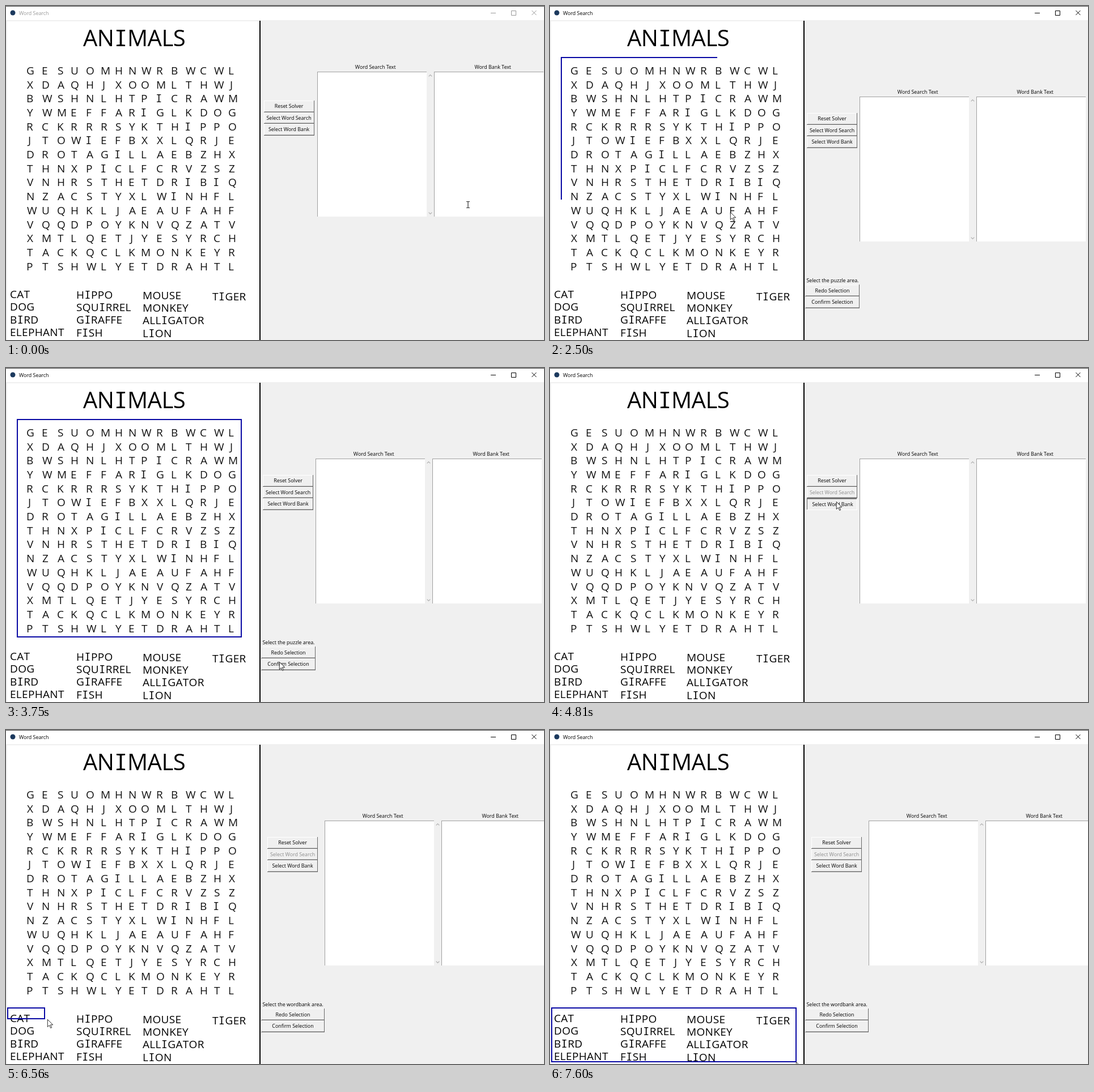
Write an HTML page with a canvas that moves like this. It is 949 px wide and 590 px high and loops after 8 s.

```html
<!DOCTYPE html>
<html lang="en">
<head>
<meta charset="utf-8">
<title>Word Search</title>
<style>
html, body { margin: 0; width: 100%; height: 100%; overflow: hidden; background: #f0f0f0; }
canvas { display: block; }
</style>
</head>
<body>
<canvas id="stage" width="949" height="590"></canvas>
<script>
const ctx = document.getElementById('stage').getContext('2d');
const LOOP = 8000;
const FACE = '#f0f0f0';
const UI_FONT = '8.9px "Open Sans", "Noto Sans", sans-serif';

const GRID = [
  'GESUOMHNWRBWCWL', 'XDAQHJXOOMLTHWJ', 'BWSHNLHTPICRAWM', 'YWMEFFARIGLKDOG',
  'RCKRRRSYKTHIPPO', 'JTOWIEFBXXLQRJE', 'DROTAGILLAEBZHX', 'THNXPICLFCRVZSZ',
  'VNHRSTHETDRIBIQ', 'NZACSTYXLWINHFL', 'WUQHKLJAEAUFAHF', 'VQQDPOYKNVQZATV',
  'XMTLQETJYESYRCH', 'TACKQCLKMONKEYR', 'PTSHWLYETDRAHTL'
];
const COLS = [37, 64, 91, 115, 142, 168, 193, 217, 239, 266, 292, 317, 343, 367, 393];
const BANK = [
  [8, 516, 'CAT DOG BIRD ELEPHANT'],
  [125, 516.5, 'HIPPO SQUIRREL GIRAFFE FISH'],
  [242, 517.5, 'MOUSE MONKEY ALLIGATOR LION'],
  [365, 520, 'TIGER']
];

// Tracks: start point, then moves [first step, last step, steps, x, y, eased]
const POINTER = { x: 815, y: 351, moves: [
  [70, 690, 9, 496, 197, 1],
  [1020, 1490, 7, 61, 118, 1], [1560, 1630, 2, 15, 95],
  [1800, 1870, 2, 20, 91],
  [2040, 2500, 7, 318, 364], [2580, 2810, 4, 410, 466], [2890, 2890, 1, 414, 471],
  [2970, 3050, 2, 415, 476],
  [3370, 3750, 6, 482, 519, 1],
  [4240, 4640, 6, 505, 236, 1],
  [4970, 5610, 9, 6, 494, 1], [5680, 5680, 1, 1, 494],
  [5840, 5910, 2, 0, 492], [6080, 6080, 1, 2, 491],
  [6410, 6560, 3, 73, 511], [6640, 7200, 8, 419, 579], [7280, 7600, 5, 434, 586]
] };
const PUZZLE_BOX = { x: 20, y: 91, from: 2040, to: 4170, moves: [
  [2040, 2500, 7, 295, 342], [2580, 2890, 5, 412, 468.5], [2970, 3050, 2, 415, 475]
] };
const BANK_BOX = { x: 3, y: 491, from: 6410, to: LOOP, moves: [
  [6410, 6560, 3, 68, 510], [6640, 7200, 8, 417, 578], [7280, 7600, 5, 433.5, 586]
] };

function position(track, t) {
  let { x, y } = track;
  for (const [t0, t1, n, tx, ty, eased] of track.moves) {
    if (t < t0) break;
    const step = n > 1 ? Math.floor((t - t0) / (t1 - t0) * (n - 1) + 0.15) + 1 : 1;
    let p = Math.min(step, n) / n;
    if (eased) p = (p + p * p * (3 - 2 * p)) / 2;
    x += (tx - x) * p;
    y += (ty - y) * p;
  }
  return { x: Math.round(x), y: Math.round(y) };
}

function fill(x, y, w, h, color) {
  ctx.fillStyle = color;
  ctx.fillRect(x, y, w, h);
}

function path(points, color, width, closed) {
  ctx.beginPath();
  points.forEach(([x, y]) => ctx.lineTo(x, y));
  if (closed) ctx.closePath();
  ctx.strokeStyle = color;
  ctx.lineWidth = width;
  ctx.stroke();
}

function label(text, x, y, align = 'center', color = '#000') {
  ctx.font = UI_FONT;
  ctx.textAlign = align;
  ctx.fillStyle = color;
  ctx.fillText(text, x, y + 3.2);
}

// Puzzle lettering: plain sans, with a barred capital I
function setLetterFont(ch, size) {
  ctx.font = size + (ch === 'I' ? 'px "Noto Sans Mono", monospace' : 'px "Open Sans", sans-serif');
}

function word(text, x, y, size, gap) {
  ctx.textAlign = 'left';
  ctx.fillStyle = '#000';
  for (const ch of text) {
    setLetterFont(ch, size);
    ctx.fillText(ch, x, y);
    x += ctx.measureText(ch).width + gap;
  }
}

function drawPuzzle() {
  fill(2, 27, 446, 563, '#fff');
  fill(447, 26, 2, 564, '#000');
  word('ANIMALS', 136, 70.5, 40, -0.5);
  ctx.fillStyle = '#111';
  GRID.forEach((row, r) => [...row].forEach((ch, c) => {
    setLetterFont(ch, 19);
    const inset = ctx.measureText(ch).actualBoundingBoxLeft;
    ctx.fillText(ch, COLS[c] + inset, 120.8 + r * 24.7);
  }));
  for (const [x, y, words] of BANK) {
    words.split(' ').forEach((text, i) => word(text, x - 1, y + i * 22.4, 19, 0.3));
  }
}

function drawTitleBar(active) {
  const ink = active ? '#000' : '#999';
  fill(0, 0, 949, 25, '#fff');
  fill(0, 0, 949, 1, '#4a4a4a');
  ctx.fillStyle = '#1c3a5e';
  ctx.beginPath();
  ctx.arc(12, 12, 4.5, 0, 7);
  ctx.fill();
  label('Word Search', 23, 12.5, 'left', ink);
  path([[855, 12.5], [864, 12.5]], ink, 1);
  path([[891.5, 8.5], [899.5, 8.5], [899.5, 16.5], [891.5, 16.5]], ink, 1, true);
  path([[927.5, 8], [935.5, 16]], ink, 1);
  path([[935.5, 8], [927.5, 16]], ink, 1);
}

function button(text, cx, y, w, { down = false, off = false } = {}) {
  const x = Math.round(cx - w / 2), h = 20.5, d = down ? 1 : 0;
  const y0 = Math.round(y), y1 = Math.round(y + h);
  fill(x, y0, w, y1 - y0, FACE);
  fill(x, y0, w, 1, down ? '#696969' : '#fff');
  fill(x, y0, 1, y1 - y0, down ? '#696969' : '#fff');
  if (down) fill(x + 1, y0 + 1, w - 1, 1, '#a0a0a0');
  else fill(x + 1, y1 - 2, w - 2, 1, '#b4b4b4');
  fill(x, y1 - 1, w, 1, down ? '#fff' : '#696969');
  fill(x + w - 1, y0, 1, y1 - y0, down ? '#fff' : '#696969');
  label(text, cx + d, y + 10.2 + d, 'center', off ? '#8c8c8c' : '#000');
}

function textBox(x, y, w, h) {
  fill(x, y, w, h, '#fff');
  fill(x, y, w, 1, '#a0a0a0');
  fill(x, y, 1, h, '#a0a0a0');
}

function chevron(x, y, dir) {
  path([[x - 2.8, y + 1.4 * dir], [x, y - 1.4 * dir], [x + 2.8, y + 1.4 * dir]], '#b0b0b0', 1.2);
}

function drawControls(t) {
  const first = t < 1020, wide = t >= 4890;
  const cx = first ? 499 : wide ? 505.5 : 497.5;
  const left = first ? 549 : wide ? 562 : 546;
  const top = first ? 116 : 160;
  const by = first ? 167 : 189;

  button('Reset Solver', cx, by, 89);
  button('Select Word Search', cx, by + 20.5, 89, { down: t >= 940 && first, off: t >= 4170 });
  button('Select Word Bank', cx, by + 41, 89, { down: t >= 4810 && !wide });

  label('Word Search Text', left + 102.7, top - 8.6);
  label('Word Bank Text', left + 309.7, top - 8.6);
  textBox(left, top, 193, 256);
  textBox(left + 206, top, 193, 256);
  chevron(left + 199.5, top + 7, 1);
  chevron(left + 199.5, top + 250, -1);

  if ((!first && t < 4170) || wide) {
    const w = wide ? 112 : 96, mid = 450 + w / 2;
    label(`Select the ${wide ? 'wordbank' : 'puzzle'} area.`, 452.5, 484.3, 'left');
    button('Redo Selection', mid, 492.4, w);
    button('Confirm Selection', mid, 513, w, { down: t >= 4090 && !wide });
  }
}

function drawSelection(box, t) {
  if (t < box.from || t >= box.to) return;
  const { x, y } = position(box, t);
  const blue = '#0808a4';
  if (t >= 2300 && t < 2700) {
    // Fast drag: the far edges are not painted yet
    path([[box.x, y], [box.x, box.y], [x, box.y]], blue, 2);
  } else {
    path([[box.x, box.y], [x, box.y], [x, y], [box.x, y]], blue, 2, true);
  }
}

function drawPointer(t) {
  const { x, y } = position(POINTER, t);
  const inBox = t < 940 && y > 116 && y < 372 && (x > 755 || (x > 549 && x < 741));
  if (inBox) {
    fill(x - 0.5, y - 6, 1, 12, '#000');
    fill(x - 3, y - 6, 6, 1, '#333');
    fill(x - 3, y + 5, 6, 1, '#333');
    return;
  }
  ctx.save();
  ctx.translate(x + 0.3, y + 0.3);
  ctx.scale(0.82, 0.82);
  const arrow = [[0, 0], [0, 16], [3.8, 12.5], [6.6, 18.5], [9, 17.5], [6.3, 11.6], [11.5, 11.6]];
  ctx.beginPath();
  arrow.forEach(([px, py]) => ctx.lineTo(px, py));
  ctx.closePath();
  ctx.fillStyle = '#fff';
  ctx.fill();
  path(arrow, '#000', 1, true);
  ctx.restore();
}

function frame() {
  const t = performance.now() % LOOP;
  fill(0, 0, 949, 590, FACE);
  drawTitleBar(t >= 940);
  drawPuzzle();
  drawControls(t);
  drawSelection(PUZZLE_BOX, t);
  drawSelection(BANK_BOX, t);
  drawPointer(t);
  requestAnimationFrame(frame);
}
frame();
</script>
</body>
</html>
```
